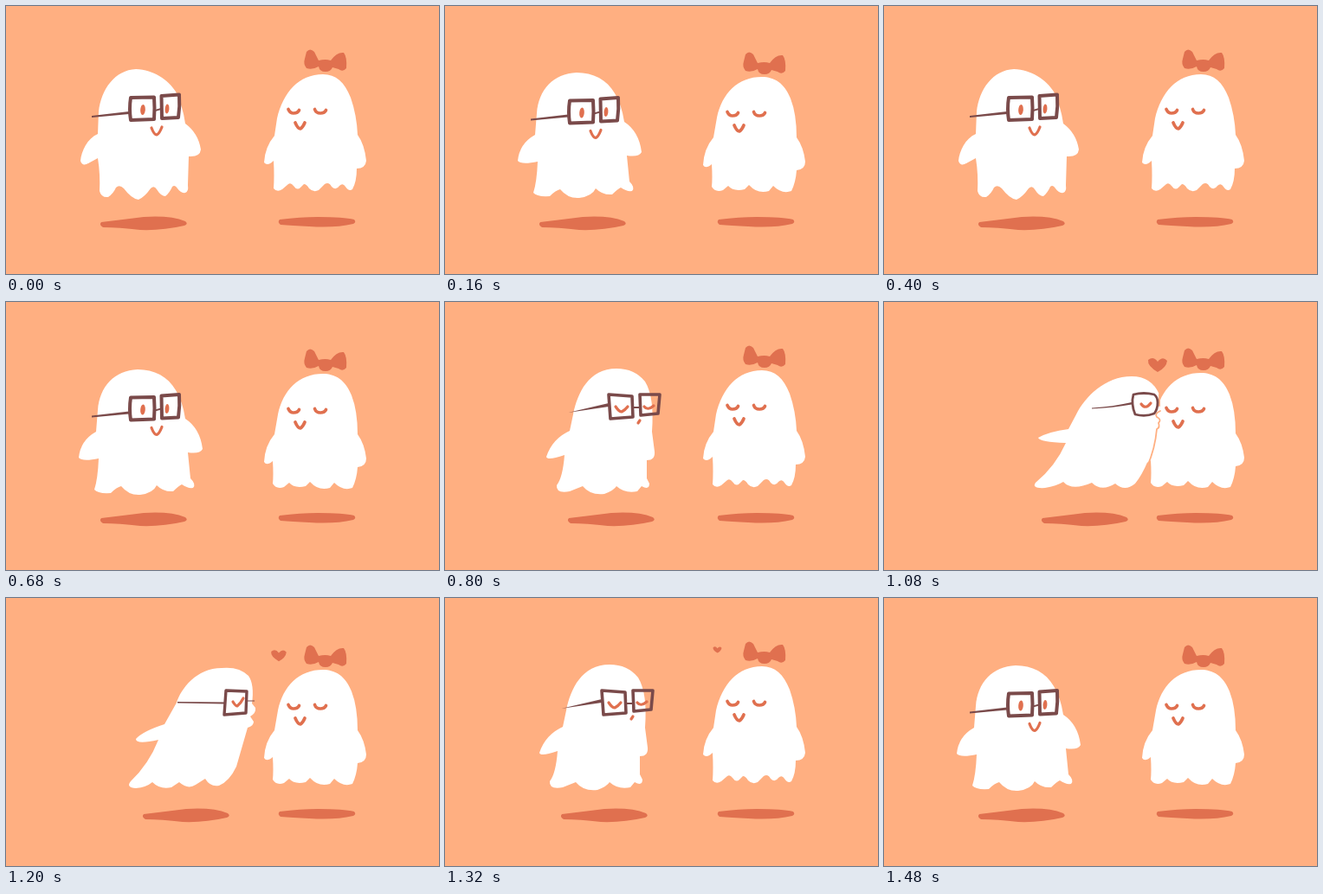
Animation, 500 px wide and 310 px high, one loop 1.6 s. Source, as an HTML page with a canvas:

```html
<!DOCTYPE html>
<html lang="en">
<head>
<meta charset="utf-8">
<title>Ghost kiss</title>
<style>
html, body { margin: 0; width: 100%; height: 100%; overflow: hidden; background: #ffaf81; }
canvas { display: block; }
</style>
</head>
<body>
<canvas id="stage" width="500" height="310"></canvas>
<script>
const ctx = document.getElementById('stage').getContext('2d');
const PEACH = '#ffaf81', CORAL = '#e0704f', BROWN = '#7a4a4a', WHITE = '#fff';

// Boy poses: body, glasses frame, tapered temple and bridge, face strokes, shadow shift
const upright = {
  frame: 'M144 106 L171 105.5 Q172 118 171 131 L144 132 Q142 119 144 106Z M179.5 104 L200 102.5 Q201 116 199 129 L180 130Z',
  frameWidth: 4,
  temple: 'M99 127 L142 122 V125 L99 129Z M172 120 L179 118 V120 L172 122Z',
  face: 'M168 141 Q171 149 174 149 Q177 148 180 140',
  eyes: [[158, 120, 2.8, 6], [186, 119, 2.4, 5.5]],
  shadow: 0
};
const boy = {
  high: { ...upright,
    body: 'M150 73 C126 74 110 96 107 122 L106 148 C94 153 87 168 86 179 Q88 186 95 182 L106 176 Q109 195 108 214 Q110 222 118 221 Q124 217 127 210 Q131 206 136 211 Q145 223 153 224 Q160 221 167 211 Q171 207 174 212 Q179 220 184 220 Q189 216 192 209 Q195 206 198 211 Q202 217 207 216 Q211 215 210 207 L211 174 Q224 175 225 166 Q222 147 207 136 Q204 115 196 99 C187 85 171 74 150 73Z'
  },
  low: { ...upright, faceDrop: 4.5,
    body: 'M152 78 C125 79 108 98 106 125 L104 150 Q86 160 84 180 Q88 185 107 181 Q106 205 102 217 Q106 222 121 221 Q128 214 133 213 Q142 224 155 223 Q170 221 174 212 Q182 220 193 219 Q199 213 203 211 Q210 216 216 215 Q220 211 213 204 L210 174 Q224 176 227 170 Q224 146 207 135 Q204 115 196 102 C187 86 171 78 152 78Z'
  },
  turn: {
    body: 'M190 77 C158 77 145 105 140 130 L136 149 Q116 158 109 179 Q110 184 130 177 Q128 203 121 212 Q120 222 136 219 L151 213 Q160 224 176 222 Q187 218 190 213 Q200 222 214 219 L219 213 Q228 218 228 210 L225 204 V183 Q235 183 234 173 L231 150 Q234 110 223 92 Q211 77 190 77Z',
    frame: 'M181 107 L208 109 209 133 183 135Z M217 107 L240 107 238 129 218 131Z',
    frameWidth: 3.6,
    temple: 'M134 128 L181 117 V121Z M210 121 H218 V123 H210Z',
    face: 'M189 121 Q193 127 196 127 Q200 125 203 121 M222 121 Q226 126 233 120 M217 137 L215 140',
    shadow: 25
  },
  lean: {
    body: 'M261 81 C232 81 214 105 209 121 L195 146 Q170 154 162 163 Q162 170 188 164 Q177 192 156 212 Q150 219 162 220 Q174 219 181 213 Q190 222 203 219 L212 213 Q222 222 231 216 L242 209 Q248 219 258 217 Q270 212 278 195 L291 150 Q298 148 298 143 L294 137 Q301 133 300 127 L296 122 Q299 100 292 90 Q281 79 261 81Z',
    frame: 'M266 107 L290 108 289 133 264 135Z',
    frameWidth: 3.4,
    temple: 'M210 120 L264 120.5 V122.5 L210 121.5Z M290 118.5 H299 V119.5 H290Z',
    face: 'M274 120 Q277 125 279 125 Q283 122 286 116',
    shadow: 61
  },
  kiss: {
    body: 'M286 86 C255 86 232 110 222 130 L213 147 Q190 150 178 157 Q180 162 210 163 Q198 190 175 209 Q170 216 186 215 Q199 213 207 208 Q217 219 240 209 Q251 220 267 210 Q278 220 290 210 Q306 190 314 152 L315 147 318 140 315 133 319 126 318 107 Q309 86 286 86Z',
    frame: 'M288 107 Q300 104 312 107 Q316 110 316 116 Q316 124 312 129 Q302 133 290 130 Q285 118 288 107Z',
    frameWidth: 2.8,
    temple: 'M240 122.5 Q264 121 286 116 V118.5 Q264 122.5 240 123.5Z',
    face: 'M297 118 Q302 125 308 117',
    outline: 'M318 107 L318 120 M319 126 Q312 129 315 133 Q321 136 317 140 Q319 145 315 147 Q313 170 304 190',
    shadow: 73
  }
};

const girl = {
  high: 'M366 79 C338 79 320 100 313 130 L310 150 Q299 163 298 181 Q302 186 309 179 Q310 197 309 211 Q313 216 319 212 L326 206 Q329 204 332 208 Q336 214 340 210 L344 206 Q347 206 350 211 Q355 216 361 213 L368 206 Q373 203 376 209 Q381 214 385 208 Q389 204 392 209 Q396 215 400 212 Q405 203 405 188 Q415 188 416 179 Q414 160 406 149 Q405 126 398 106 C391 88 381 79 366 79Z',
  low: 'M366 83 C338 83 320 102 314 130 L310 153 Q299 166 298 185 Q301 190 308 184 Q309 200 308 210 Q312 217 321 214 L327 209 Q333 216 346 213 L351 208 Q361 219 374 215 L379 209 Q389 219 400 215 Q405 205 406 191 Q416 190 416 181 Q414 164 406 153 Q406 126 399 108 C392 90 380 83 366 83Z',
  face: 'M326 119.5 Q328 124 332 124 Q337 124 338.5 120.5 M356.5 119.5 Q358 124 363 124 Q368 124 369.5 120.5 M334 135 Q337 142 340 142 Q343 140 345 135',
  bow: 'M347 53 Q351 48 356 53 L361 63 Q369 61 375 63 Q382 53 390 54 Q394 59 393 72 Q389 77 384 73 L377 71 Q375 76 369 76 Q362 76 361 70 Q354 74 347 72 Q343 67 345 61Z'
};
const boyShadow = 'M110 250 Q135 247 159 244 Q190 242 207 249 Q211 252 206 254 Q180 260 155 259 Q130 256 112 256 Q107 253 110 250Z';
const girlShadow = 'M316 247 Q340 244 360 244 Q390 244 402 247 Q405 250 401 252 Q380 257 350 255 Q330 254 317 253 Q313 250 316 247Z';
const heartPath = 'M0 -3 Q6 -10 11 -4 Q10 4 0 9 Q-12 2 -11 -5 Q-5 -10 0 -3Z';

// Held drawings: end time, boy pose, boy shift, girl height, heart [x, y, scale]
const LOOP = 1600;
const steps = [
  [160, 'high', 0, 'high'],
  [280, 'low', 0, 'mid'],
  [400, 'low', 0, 'low'],
  [560, 'high', 0, 'high'],
  [680, 'low', 0, 'mid'],
  [800, 'low', 0, 'low'],
  [880, 'turn', 8, 'high'],
  [960, 'lean', 0, 'mid'],
  [1080, 'kiss', -5, 'mid'],
  [1200, 'kiss', 0, 'mid', [316, 72, 1]],
  [1320, 'lean', -12, 'low', [315, 66, 0.8]],
  [1400, 'turn', 0, 'high', [314.5, 59.5, 0.45]],
  [1480, 'turn', -13, 'mid'],
  [LOOP, 'low', 0, 'low']
];

function fill(path, color) {
  ctx.fillStyle = color;
  ctx.fill(new Path2D(path));
}

function stroke(path, color, width) {
  ctx.strokeStyle = color;
  ctx.lineWidth = width;
  ctx.stroke(new Path2D(path));
}

function at(x, y, draw) {
  ctx.save();
  ctx.translate(x, y);
  draw();
  ctx.restore();
}

function drawGirl(height) {
  const high = height === 'high';
  fill(girlShadow, CORAL);
  at(0, height === 'mid' ? -1 : 0, () => {
    fill(high ? girl.high : girl.low, WHITE);
    at(0, high ? 0 : 4, () => {
      fill(girl.bow, CORAL);
      stroke(girl.face, CORAL, 3.7);
    });
  });
}

function drawBoy(pose, dx, dy) {
  at(pose.shadow + dx, 0, () => fill(boyShadow, CORAL));
  at(dx, dy, () => {
    fill(pose.body, WHITE);
    if (pose.outline) stroke(pose.outline, PEACH, 1.8);
    ctx.translate(0, pose.faceDrop || 0);
    stroke(pose.face, CORAL, 3.2);
    for (const [x, y, rx, ry] of pose.eyes || []) {
      ctx.fillStyle = CORAL;
      ctx.beginPath();
      ctx.ellipse(x, y, rx, ry, 0.08, 0, 7);
      ctx.fill();
    }
    fill(pose.temple, BROWN);
    stroke(pose.frame, BROWN, pose.frameWidth);
  });
}

function render() {
  const time = performance.now() % LOOP;
  const [, pose, dx, height, heart] = steps.find(([end]) => time < end);
  ctx.fillStyle = PEACH;
  ctx.fillRect(0, 0, 500, 310);
  drawGirl(height);
  drawBoy(boy[pose], dx, height === 'mid' && pose === 'low' ? -1 : 0);
  if (heart) {
    const [x, y, scale] = heart;
    at(x, y, () => {
      ctx.scale(scale, scale);
      fill(heartPath, CORAL);
    });
  }
  requestAnimationFrame(render);
}

ctx.lineCap = ctx.lineJoin = 'round';
render();
</script>
</body>
</html>
```
